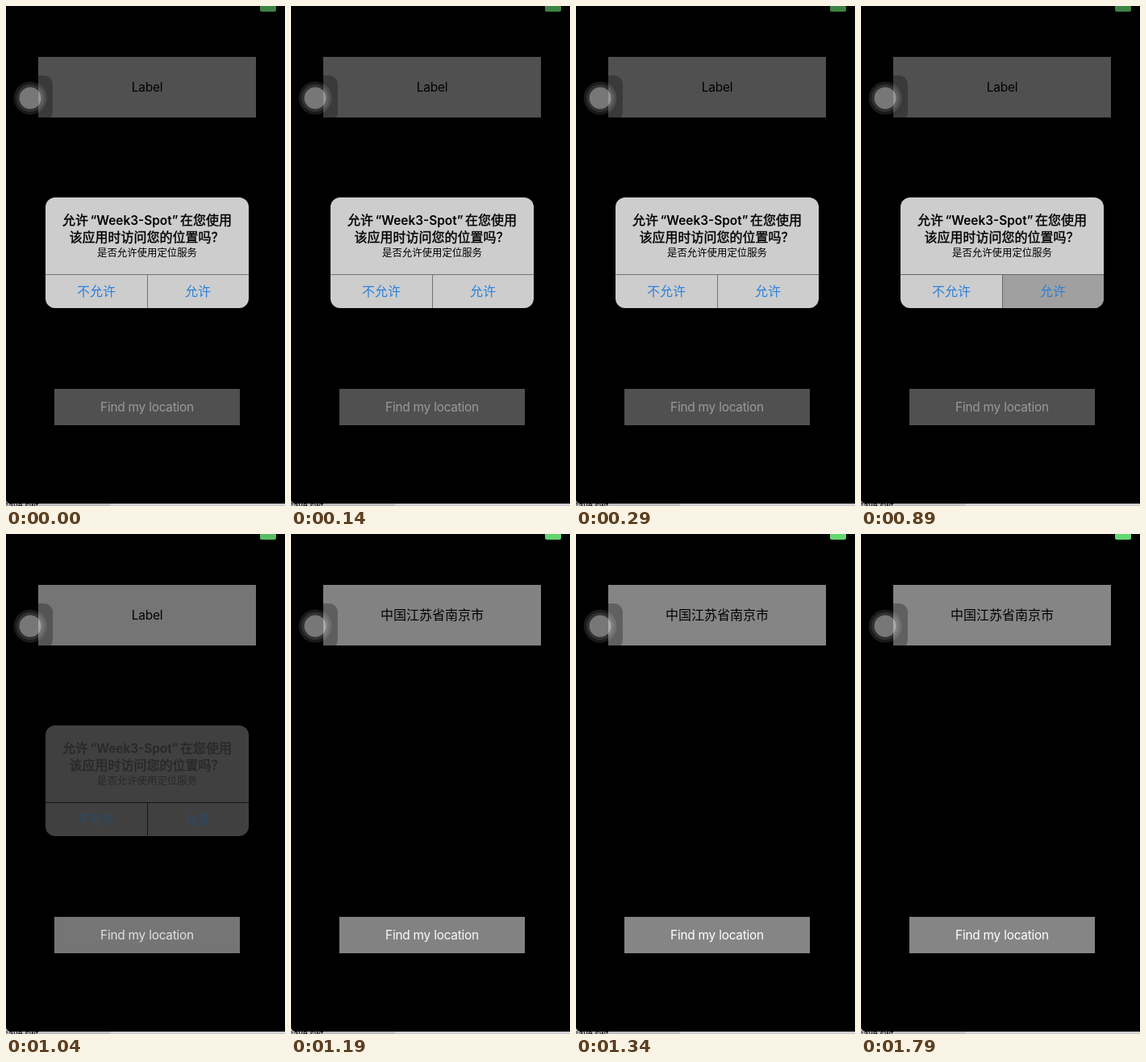
An HTML page that plays this animation: 346x619 px, repeating every 4620 ms.

```html
<!DOCTYPE html>
<html lang="zh-CN">
<head>
<meta charset="utf-8">
<title>Location permission</title>
<style>
  html, body { margin: 0; width: 100%; height: 100%; overflow: hidden; background: #000; }

  svg {
    display: block;
    width: 346px;
    height: 619px;
    font: 16px Inter, "Noto Sans CJK SC", "Noto Sans CJK", sans-serif;
    text-anchor: middle;
    animation: scene 4620ms step-end infinite;
  }

  /* Every state change is a hard cut, driven by inherited properties. */
  @keyframes scene {
    0% {
      --dim: .4; --alert: visible; --press: 0; --before: visible; --after: hidden;
      --panel: #cdcdcd; --ink: #000; --link: #2b80dc; --rule: #747474;
    }
    19.264% {
      --dim: .4; --alert: visible; --press: 1; --before: visible; --after: hidden;
      --panel: #cdcdcd; --ink: #000; --link: #2b80dc; --rule: #666;
    }
    22.51% {
      --dim: .12; --alert: visible; --press: 0; --before: visible; --after: hidden;
      --panel: #404040; --ink: #282828; --link: #2c4a6c; --rule: #141414;
    }
    25.757% {
      --dim: .02; --alert: hidden; --press: 0; --before: hidden; --after: visible;
    }
    29.004%, 100% {
      --dim: 0; --alert: hidden; --press: 0; --before: hidden; --after: visible;
    }
  }

  .latin { font-size: 15.4px; letter-spacing: -.23px; }
  .before { visibility: var(--before); }
  .after { visibility: var(--after); }
  .dim { opacity: var(--dim); }
  .alert { visibility: var(--alert); fill: var(--ink); }
  .panel { fill: var(--panel); }
  .pressed { fill: #a0a0a0; opacity: var(--press); }
  .rule { fill: var(--rule); }
  .link { fill: var(--link); }
  .title { text-anchor: start; stroke: var(--ink); stroke-width: .4px; }
  .name { font-size: 15.4px; font-weight: 600; text-anchor: middle; stroke: none; }
  .note { font-size: 12.4px; }
</style>
</head>
<body>
<svg viewBox="0 0 346 619">
  <defs>
    <clipPath id="card"><rect x="49" y="237" width="252" height="137" rx="12"/></clipPath>
    <clipPath id="field"><rect x="40" y="63" width="270" height="75"/></clipPath>
  </defs>

  <!-- desktop edge below the phone -->
  <rect y="606" width="129" height="13" fill="#bebebe"/>
  <rect x="129" y="606" width="217" height="13" fill="#d0d0d0"/>
  <text x="-2" y="621.5" font-size="10" text-anchor="start">saVe.swt</text>
  <path d="M0 0H346V616H7Q1 616 0 611Z"/>

  <!-- app screen -->
  <path d="M315 0H335V5Q335 7 333 7H317Q315 7 315 5Z" fill="#63d873"/>
  <rect x="40" y="63" width="270" height="75" fill="#858585"/>
  <rect x="60" y="474" width="230" height="45" fill="#858585"/>
  <text class="latin before" x="175" y="106">Label</text>
  <text class="after" x="175" y="106">中国江苏省南京市</text>
  <text class="latin" x="175" y="502" fill="#fff">Find my location</text>
  <rect class="dim" width="346" height="616"/>

  <!-- floating touch button -->
  <rect x="2" y="86" width="56" height="56" rx="11" fill-opacity=".28" clip-path="url(#field)"/>
  <g fill="#fff">
    <circle cx="30" cy="114" r="20.5" fill-opacity=".1"/>
    <circle cx="30" cy="114" r="17" fill-opacity=".1"/>
    <circle cx="30" cy="114" r="13.5" fill-opacity=".34"/>
  </g>

  <!-- permission alert -->
  <g class="alert" clip-path="url(#card)">
    <rect class="panel" x="49" y="237" width="252" height="137"/>
    <rect class="pressed" x="175" y="332" width="126" height="42"/>
    <path class="rule" d="M49 332H301V333H176V374H175V333H49Z"/>
    <text class="title" y="271"><tspan x="70">允许</tspan><tspan class="name" x="159">“Week3-Spot”</tspan><tspan x="216">在您使用</tspan></text>
    <text class="title" x="78.5" y="291.5">该应用时访问您的位置吗？</text>
    <text class="note" x="175" y="310">是否允许使用定位服务</text>
    <text class="link" x="112" y="359">不允许</text>
    <text class="link" x="238" y="359">允许</text>
  </g>
</svg>
</body>
</html>
```
